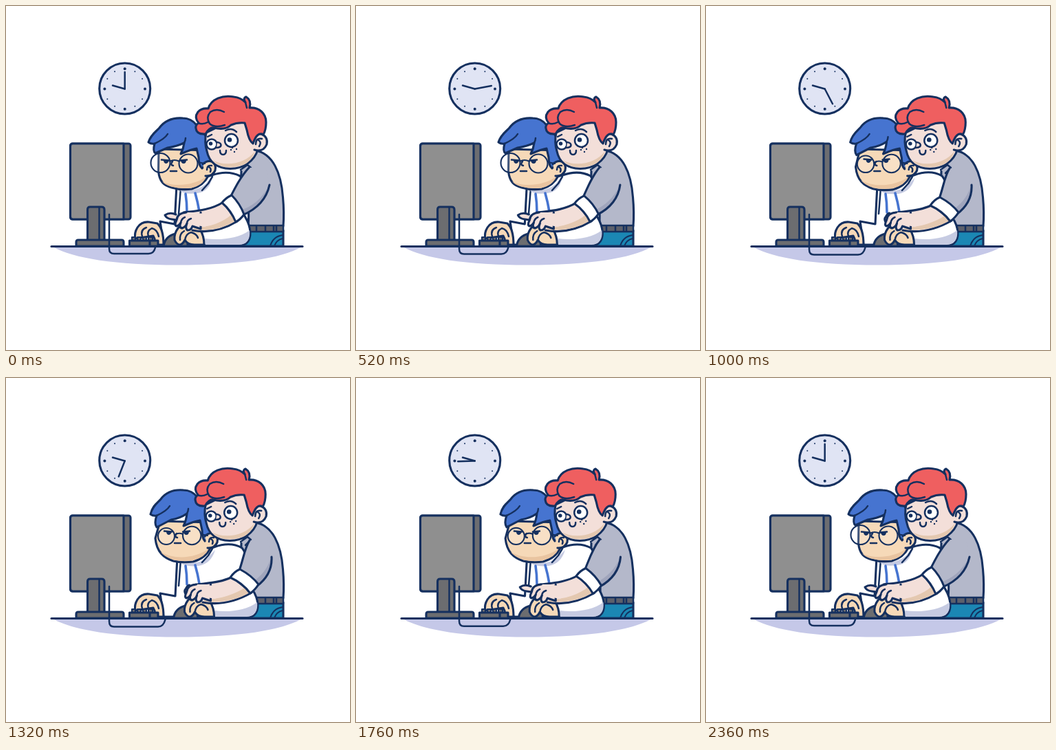
Write an HTML page that moves like this. It is 500 by 500 pixels and loops after 2.4 s.

```html
<!DOCTYPE html>
<html lang="en">
<head>
<meta charset="utf-8">
<title>Helping at the computer</title>
<style>
  html, body { margin: 0; width: 100%; height: 100%; overflow: hidden; background: #fff; }
  svg { display: block; width: 100%; height: 100%; }
  .ink { stroke: #15305f; stroke-width: 3.1; stroke-linecap: round; stroke-linejoin: round; fill: none; }
  .thin { stroke-width: 2.5; }
  .fine { stroke-width: 2.1; }
  .bare { stroke: none; }
  .dot { fill: #15305f; stroke: none; }
  .white { fill: #fff; }
  .grey { fill: #8f8f8f; }
  .dark { fill: #6c6d70; }
  .shirt { fill: #b4b8ca; }
  .shade { fill: #c6cbe2; }
  .pale { fill: #f3dfd9; }
  .paleShade { fill: #e4c8b0; }
  .skin { fill: #f6d9b8; }
  .red { fill: #ef5f60; }
  .blue { fill: #4674d0; }
</style>
</head>
<body>
<svg viewBox="0 0 500 500" class="ink">
  <!-- clock -->
  <circle cx="172.7" cy="120" r="37" fill="#e0e4f4"/>
  <g id="ticks" class="dot"></g>
  <path class="thin" d="M172.7 120.5L155 115.5"/>
  <path class="thin" id="minute" d="M172.7 120.5V96"/>

  <!-- desk -->
  <path class="bare" fill="#c5c8e8" d="M68 350C98 367 160 376.5 249 376.5S400 367 430 350Z"/>

  <!-- monitor -->
  <rect class="dark" x="93.5" y="200" width="87.5" height="110" rx="3"/>
  <path class="grey" d="M97 200H171V310H97Q93.5 310 93.5 306V204Q93.5 200 97 200Z"/>
  <path class="dark" d="M118.5 348V296Q118.5 292 122 292H139Q143 292 143 296V348Z"/>
  <path class="thin" d="M135.5 293V340"/>
  <path class="dark" d="M102 349V343Q102 340 105 340H168Q171 340 171 343V349Z"/>

  <!-- standing body -->
  <path fill="#1b87b4" d="M345 349V326H403V349Z"/>
  <path class="fine" d="M402 333Q388 335 384 349M402 338Q393 340 390 349"/>
  <path class="shirt" d="M342 240L362 210C388 214 400 243 402.5 278Q404.5 300 403 320H340Z"/>
  <path class="thin" fill="#5d606b" d="M345 319H403V328H345ZM364 319V328M377 319V328M389 319V328M393 319V328"/>

  <!-- seated body and left arm -->
  <path class="white" d="M248 260L245 317L224 313L229 347H345C360 310 350 262 340 247Q322 238 299 246Z"
    data-key="slide" data-to="M249 260L246 317L224 313L229 347H352C364 310 354 260 343 247Q326 237 302 246Z"/>
  <path class="thin" d="M254 264L251 302"/>
  <path class="bare shade" d="M252 263Q272 273 290 259L300 248Q296 270 278 272Q258 275 252 267Z"
    data-key="turn" data-to="M252 264Q274 274 292 262L304 250Q298 270 280 273Q258 275 252 267Z"/>
  <path stroke="#4674d0" stroke-width="3.6" d="M261 273Q263 286 263 300M275 272Q279 286 281 299"/>
  <path class="thin" d="M285 268L294 258L300 248"/>

  <!-- keyboard and left hand -->
  <path class="skin" d="M188 338Q186 330 191 322Q197 313 208 314L220 316Q229 324 229 347H213Q219 342 214 334Z"/>
  <path class="thin" d="M198 335Q195 325 204 322M207 335Q204 327 212 323Q220 325 222 335"/>
  <path class="dark fine" d="M183 340V336H188V340M191 340V336H196V340M199 340V336H204V340M207 340V336H213V340"/>
  <path class="dark" d="M179.5 349V341H221V349ZM209 341V349"/>

  <!-- mouse, right sleeve and hand -->
  <path class="dark" d="M229 349Q231 335 246 331H264V349Z" data-move="slide 14.5 0"/>
  <path class="white" d="M284 326C302 329 326 318 344 301C355 316 358 333 352 342Q348 348 339 348H288Z"
    data-key="slide" data-to="M298 326C314 329 338 319 354 302C366 316 369 333 363 342Q359 348 350 348H302Z"/>
  <path class="bare shade" d="M289 338C312 341 338 338 354 326Q356 346 339 347H290Z"
    data-key="slide" data-to="M303 338C324 341 349 338 365 326Q367 346 350 347H304Z"/>
  <g data-move="slide 14.5 0">
    <path class="skin" d="M245 340Q244 331 250 323Q256 316 270 318L282 325Q288 334 288 347H274Q264 347 260 340Q257 346 253 347Q248 347 245 340Z"/>
    <path class="thin" d="M253 340Q252 331 259 327M260 341Q261 331 269 329Q277 331 279 337"/>
  </g>

  <!-- seated head -->
  <path class="skin" d="M222 208L221.5 240C223 255 229 261 241 264Q254 268 270 266Q287 261 294 247L298 210Z"
    data-key="turn" data-to="M224 208L217 233C219 253 229 261 243 266Q256 269 272 267Q290 262 297 247L300 210Z"/>
  <path class="bare" fill="#e9c4a0" d="M227 255C242 263 272 262 291 248Q286 261 269 264.500Q252 266 240 262.500Q231 260 227 255Z"
    data-key="turn" data-to="M225 253C244 264 274 263 295 248Q289 261 272 265Q254 267 243 264Q230 260 225 253Z"/>
  <path class="blue" d="M207 198C211 186 219 182 223 177C232 165 244 162 257 163Q269 163 277 173C290 183 297 198 298 223L285 236Q280 232 280 220L277 207Q270 208 254 215Q258 207 259 199Q248 204 235 206L217 214Q213 211 216 200Q211 201 207 198Z"
    data-key="turn" data-to="M210 198C213 185 221 181 225 176C234 164 246 162 258 163Q270 163 278 173C292 183 300 198 301 223L289 237Q285 233 285 221L282 207Q274 208 258 215Q262 207 263 197Q253 204 240 206L219 217Q215 211 219 200Q214 201 210 198Z"/>
  <path class="thin" d="M216 200Q231 193 235 186M259 199Q261 195 261 192"
    data-key="turn" data-to="M219 200Q234 193 238 186M263 197Q265 193 265 190"/>
  <g data-move="turn 3 0">
    <path class="skin" d="M286 230Q292 224 299 226Q306 230 304 239Q300 248 290 247"/>
    <path class="thin" d="M292 238Q292 231 299 232M295 234Q299 236 297 241"/>
  </g>
  <path class="fine" fill="#ffffff30" d="M210.500 228a14 14 0 1 0 28 0a14 14 0 1 0 -28 0M251.500 229a13.500 13.500 0 1 0 27 0a13.500 13.500 0 1 0 -27 0M238 226Q245 222 252 226M279 227L289 229"
    data-key="turn" data-to="M221 230a12 12 0 1 0 24 0a12 12 0 1 0 -24 0M257 229a13.200 13.200 0 1 0 26.400 0a13.200 13.200 0 1 0 -26.400 0M245 228Q251 224 257 227M283 227L293 229"/>
  <g class="thin">
    <g data-move="turn 4 -1">
      <path d="M226 223.500L237 224.500M253 224.500L263 223.500"/>
      <path class="dot" d="M229 224H237Q236 229 232 229Q229 228 229 224ZM254 225L262 224Q262 229 258 229Q255 229 254 225Z"/>
    </g>
    <path d="M242 226Q238 231 243 232M239 240L248 240" data-move="turn 6 0"/>
  </g>

  <!-- standing head -->
  <g data-move="turn -0.8 0">
    <path class="pale" d="M291 184Q288 198 292 211C295 226 306 236 326 236.500Q341 236 350 230Q363 221 366 208L368 175L340 160Z"/>
    <path class="bare paleShade" d="M300 224C318 234 348 230 362 211Q358 224 347 230Q316 241 300 224Z"/>
    <path class="pale" d="M357 194Q362 184 371 186Q381 190 379 201Q374 213 361 209"/>
    <path class="thin" d="M363 201Q363 191 372 193M367 195Q372 198 368 204"/>
    <path class="red" d="M290 186Q277 187 276 178Q275 173 280 170Q273 162 279 154Q284 148 294 149C298 135 315 129 331 132Q341 133 348 140Q344 134 349 132Q357 137 354 148C368 147 378 156 378 169Q378 180 374 187Q365 182 359 200Q353 196 350 180L347 170Q336 169 327 173Q319 181 302 177Q296 176 290 186Z"/>
    <path class="thin" d="M279 170Q286 173 293 169M317 154Q306 148 297 154Q290 162 296 171Q304 178 318 173M348 140L350 148"/>
    <g class="thin">
      <path d="M319 181Q328 176 335 183M293 190L299 187"/>
      <circle class="white" cx="299" cy="201" r="7.500"/>
      <circle class="white" cx="327.500" cy="195.500" r="9.500"/>
      <path class="pale" d="M307 198Q314 199 312 204Q310 206 306 206"/>
      <path d="M311 210Q311 216 315.500 216Q320 216 320 210"/>
    </g>
    <g class="dot">
      <circle cx="297.500" cy="200" r="2.800"/><circle cx="325" cy="194.500" r="3.300"/>
      <circle cx="327" cy="209" r="1.200"/><circle cx="332" cy="212" r="1.200"/>
      <circle cx="329" cy="206" r="1.200"/><circle cx="335" cy="208" r="1.200"/>
    </g>
  </g>
  <path class="thin shirt" d="M341 238L351 231L356 235L348 243"/>

  <!-- guiding arm -->
  <path class="pale" d="M271 326C297 331 318 324 336 313L316 285C297 297 276 298 258 300"
    data-key="slide" data-to="M286 326C312 331 336 324 357 312L329 289C311 298 290 298 272 301"/>
  <path class="bare paleShade" d="M273 322C296 322 316 314 328 303L334 312C317 323 296 327 273 325Z"
    data-key="slide" data-to="M288 322C311 322 334 314 348 304L355 311C337 323 311 327 288 325Z"/>
  <path class="shirt bare" d="M352 235C341 248 333 264 326 278L344 304C367 294 379 279 383 260L378 235Z"
    data-key="slide" data-to="M354 236C347 247 345 263 339 280L364 303C379 292 387 278 386 260L380 235Z"/>
  <path class="bare" fill="#a0a5bc" d="M382 262C372 280 357 292 341 297L344 303C367 294 379 279 382 262Z"
    data-key="slide" data-to="M385 262C380 277 371 288 358 297L364 302C378 292 386 278 385 262Z"/>
  <path d="M354 234C341 248 333 264 326 278M344 304C367 294 379 279 383 260"
    data-key="slide" data-to="M354 236C347 247 345 263 339 280M364 303C379 292 387 278 386 260"/>
  <path class="white" d="M314 286Q319 279 328 275Q340 287 346 303Q341 310 334 314Q327 297 314 286Z"
    data-key="slide" data-to="M326 290Q332 281 340 278Q357 287 367 300Q362 308 355 313Q344 298 326 290Z"/>
  <g data-move="slide 14.5 0">
    <path class="pale" d="M247 303Q238 299 231 304Q233 309 241 310L248 311"
      data-key="press" data-to="M252 301Q249 302 247 306Q244 309 246 313L249 315"/>
    <path class="pale" d="M262 300Q249 301 248 311Q244 319 248 320Q252 319 254 315Q251 322 256 323Q261 321 263 316Q260 324 264 326Q269 326 271 320L283 324V300"/>
    <path class="bare pale" d="M262 301.500H290V321L272 318Z"/>
    <path class="thin" d="M254 315Q255 309 260 307M263 316Q263 311 269 309"/>
  </g>

  <!-- desk edge and cable -->
  <path d="M66 349.500H431"/>
  <path class="thin" d="M150 303V353Q150 360 157 360H207Q215 360 217 351"
    data-key="slide" data-to="M150 303V354Q150 361.5 157 361.5H221Q229 361.5 231.5 351"/>
</svg>
<script>
  const LOOP = 2400, STEP = 40;
  const find = selector => [...document.querySelectorAll(selector)];
  const minute = document.getElementById('minute');

  document.getElementById('ticks').innerHTML = Array.from({ length: 12 }, (_, i) => {
    const a = i * Math.PI / 6, r = i % 3 ? 1 : 2;
    return `<circle cx="${172.7 + 29.3 * Math.sin(a)}" cy="${120.5 - 29.3 * Math.cos(a)}" r="${r}"/>`;
  }).join('');

  const smooth = (t, a, b) => {
    const u = Math.min(1, Math.max(0, (t - a) / (b - a)));
    return u * u * (3 - 2 * u);
  };
  const pulse = (t, a, b, c, d) => smooth(t, a, b) - smooth(t, c, d);

  const NUMBER = /-?\d+(?:\.\d+)?/g;
  const morphs = find('[data-to]').map(el => {
    const from = el.getAttribute('d');
    const end = el.dataset.to.match(NUMBER).map(Number);
    return pose => {
      let i = 0;
      const k = pose[el.dataset.key];
      el.setAttribute('d', from.replace(NUMBER, n => +n + (end[i++] - n) * k));
    };
  });
  const moves = find('[data-move]').map(el => {
    const [key, x, y] = el.dataset.move.split(' ');
    return pose => el.setAttribute('transform', `translate(${x * pose[key]} ${y * pose[key]})`);
  });

  function draw(now) {
    const t = Math.floor(now % LOOP / STEP) * STEP;
    const pose = {
      slide: pulse(t, 360, 800, 1540, 1980),
      turn: pulse(t, 560, 1120, 1720, 2120),
      press: pulse(t, 760, 1000, 1400, 1680)
    };
    minute.setAttribute('transform', `rotate(${360 * t / (LOOP - STEP)} 172.7 120.5)`);
    for (const update of [...morphs, ...moves]) update(pose);
    requestAnimationFrame(draw);
  }
  draw(performance.now());
</script>
</body>
</html>
```
